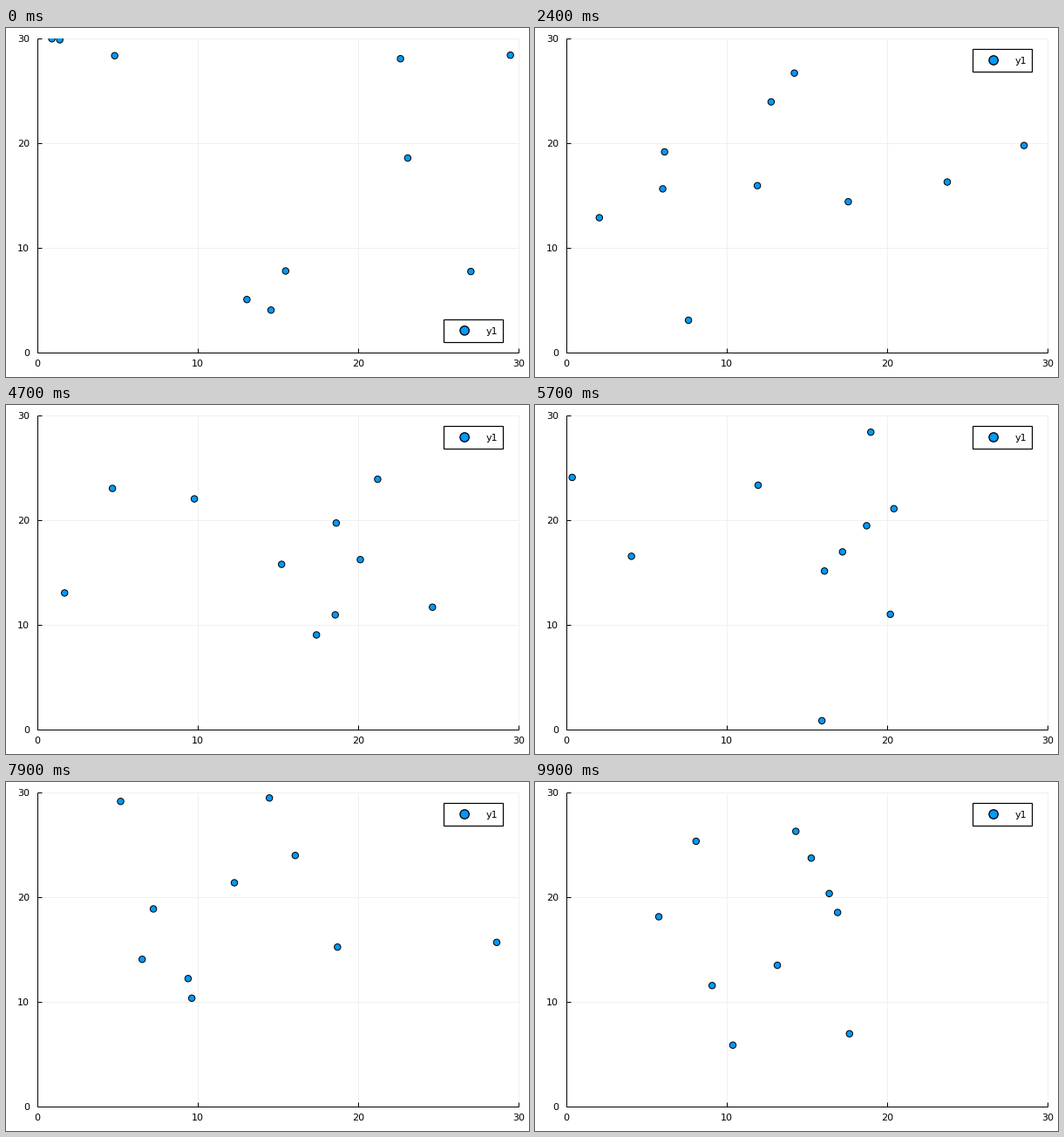
Write a matplotlib script that moves like this. It is 600 px wide and 400 px high and loops after 10 s.

```python
import numpy as np
import matplotlib.pyplot as plt
from matplotlib.animation import FuncAnimation
from matplotlib.patches import Circle, Rectangle

FRAMES, SIDE = 100, 30
LEFT, RIGHT, TOP, BOTTOM = 35.5, 588.4, 12.3, 371.85
PX = 0.72  # one pixel in points
BLUE = "#009afa"

# Waypoints per particle; values outside 0..SIDE are mirror images,
# so a path that crosses a wall bounces off it.
TIMES = np.array([0, 14, 34, 47, 67, 79, 99])
PATHS = np.array([
    [(.93, 30), (2.98, 21.58), (6.67, 11.81), (-1.72, 13.05),
     (-4.62, 21.69), (-5.21, 29.17), (-8.1, 34.64)],
    [(1.42, 29.9), (11.64, 31.68), (15.39, 35.59), (18.63, 40.26),
     (13.9, 45.31), (9.41, 47.77), (10.39, 54.14)],
    [(4.84, 28.38), (4.38, 15.05), (12.16, -6.57), (17.4, -9.04),
     (23.16, -13.07), (28.62, -15.69), (17.65, -6.95)],
    [(22.63, 28.09), (17.91, 24.58), (7.92, 23.89), (4.7, 23.05),
     (-5.21, 24.01), (-7.25, 18.89), (-9.1, 11.56)],
    [(29.47, 28.43), (27.02, 31.61), (31.43, 52.52), (35.38, 71.69),
     (43.39, 86.92), (45.53, 90.5), (45.69, 93.69)],
    [(23.08, 18.59), (27.4, 17.65), (19.08, 14.36), (18.57, 10.96),
     (12.02, -12.21), (6.55, -14.07), (5.78, -18.14)],
    [(27.01, 7.74), (18.23, 11.46), (7.93, 20.08), (9.8, 22.05),
     (14.17, 26.62), (16.08, 36), (16.39, 39.64)],
    [(13.07, 5.06), (10.67, 15.07), (-1.12, 25.5), (-15.23, 44.21),
     (-13.39, 40.62), (-12.29, 38.61), (-15.27, 36.25)],
    [(14.57, 4.05), (17.96, -8.39), (17.17, -17.49), (20.13, -16.24),
     (17.06, -21.39), (18.71, -15.24), (13.16, -13.5)],
    [(15.48, 7.79), (8.01, 7.78), (-12.53, 19.07), (-21.21, 23.93),
     (-13.7, 35.44), (-9.64, 49.65), (-16.91, 78.55)],
])
SLOPES = np.gradient(PATHS, TIMES, axis=1)

# Legend corners in order of preference: data corner, box left, box top
CORNERS = [((SIDE, SIDE), 501.5, 23.9), ((0, SIDE), 53.7, 23.9),
           ((SIDE, 0), 501.5, 333.7), ((0, 0), 53.7, 333.7)]


def fold(v):
    return SIDE - np.abs(v % (2 * SIDE) - SIDE)


def positions(t):
    """Cubic Hermite along the waypoints, reflected into the box."""
    k = min(np.searchsorted(TIMES, t, side="right") - 1, len(TIMES) - 2)
    h = TIMES[k + 1] - TIMES[k]
    u = (t - TIMES[k]) / h
    w = u * u * (3 - 2 * u)
    p = (1 - w) * PATHS[:, k] + w * PATHS[:, k + 1]
    p = p + h * u * (1 - u) * ((1 - u) * SLOPES[:, k] - u * SLOPES[:, k + 1])
    return fold(p)


def px(x):
    return LEFT + (RIGHT - LEFT) * x / SIDE


def py(y):
    return BOTTOM - (BOTTOM - TOP) * y / SIDE


def legend_spot(pts):
    for corner, left, top in CORNERS:
        d2 = (((pts - corner) / SIDE) ** 2).sum(axis=1)
        if d2.min() > 0.05:
            break
    return left, top


fig = plt.figure(figsize=(6, 4), dpi=100, facecolor="white")
ax = fig.add_axes([0, 0, 1, 1])
ax.set(xlim=(0, 600), ylim=(400, 0))
ax.axis("off")
FONT = dict(family="DejaVu Sans", size=8, color="black", va="baseline")


def line(xs, ys, color="black", z=2):
    ax.plot(xs, ys, color=color, lw=PX, zorder=z, solid_capstyle="butt")


def dot(radius, width, z):
    return ax.add_patch(Circle((0, 0), radius, fc=BLUE, ec="black",
                               lw=width * PX, zorder=z))


for v in range(0, SIDE + 1, 10):
    if v:
        line([px(v)] * 2, [TOP, BOTTOM], "#f0f0f0", 1)
        line([LEFT, RIGHT], [py(v)] * 2, "#f0f0f0", 1)
    line([px(v)] * 2, [BOTTOM, BOTTOM - 5])
    line([LEFT, LEFT + 5], [py(v)] * 2)
    ax.text(px(v), 387.5, str(v), ha="center", **FONT)
    ax.text(27.3, py(v) + 4.2, str(v), ha="right", **FONT)
line([LEFT, RIGHT], [BOTTOM] * 2)
line([LEFT] * 2, [TOP, BOTTOM])

area = Rectangle((LEFT, TOP), RIGHT - LEFT, BOTTOM - TOP,
                 transform=ax.transData)
dots = [dot(3.7, 1, 3) for _ in PATHS]
for d in dots:
    d.set_clip_path(area)

box = ax.add_patch(Rectangle((0, 0), 68.5, 26, fc="white", ec="black",
                             lw=1.2 * PX, zorder=4))
key = dot(5.2, 1.3, 5)
label = ax.text(0, 0, "y1", ha="left", zorder=5, **FONT)


def draw(i):
    pts = positions(i)
    for d, (x, y) in zip(dots, pts):
        d.center = px(x), py(y)
    left, top = legend_spot(pts)
    box.set_xy((left, top))
    key.center = left + 24.6, top + 13.1
    label.set_position((left + 48.7, top + 17.4))
    return [*dots, box, key, label]


anim = FuncAnimation(fig, draw, frames=FRAMES, interval=100,
                     repeat=True, repeat_delay=0)
plt.show()
```
